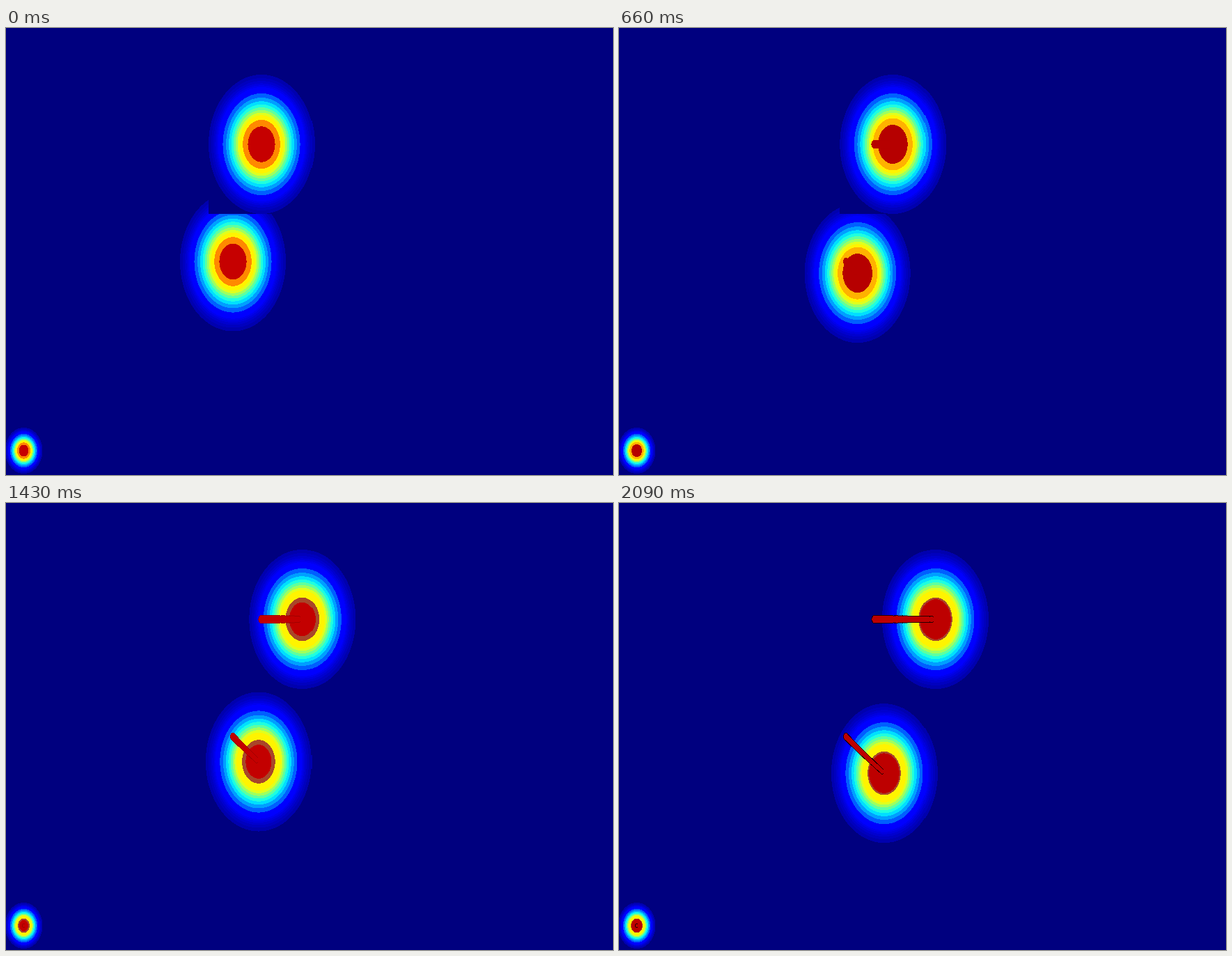
Animation, 872 px wide and 642 px high, one loop 2.2 s. Source, as a matplotlib script:

```python
import numpy as np
import matplotlib.pyplot as plt
from matplotlib.animation import FuncAnimation

W, H, FRAMES, STEP_MS = 872, 642, 20, 110
yy, xx = np.mgrid[0:H, 0:W] + 0.5


def jet(v):
    """Blue-cyan-yellow-red ramp for values from 0 to 1."""
    v = np.asarray(v, float)[..., None]
    rgb = 1.5 - abs(4 * v - np.array([3, 2, 1]))
    return np.clip(rgb, 0, 1) * 255


# Blob centres as functions of the frame number
def upper(n):
    return 367 + 4.3 * n + 0.0145 * n ** 2, 167


def lower(n):
    return 326 + 2.72 * n + 0.009 * n ** 2, 335.5 + 2.77 * n


def corner(n):
    return 25.5, 607


def core_colour(n):
    return np.array([188 + 10 * np.cos(1.4 * n), 0, 0])


def posterise(heat):
    """Fine steps in the dark blues, sixteenths above, flat yellow on top."""
    dark = np.minimum(np.round(heat * 64) / 64, 0.125)
    steps = np.floor(heat * 16) / 16 + 1 / 32
    return np.where(heat < 0.1875, dark, np.minimum(steps, 0.635))


def paint_core(rgb, r, n):
    if n % 5 < 2:
        # Warm phase: a band of the ramp around a small core
        level = np.interp(n, [0, 6, 16], [0.74, 0.70, 0.83])
        core = np.interp(n, [0, 6, 16], [0.257, 0.28, 0.18])
        rim, ring = jet(level), np.sqrt(np.log(1.12 / level) / 3.35)
    else:
        # Dull phase: a brown rim that widens and narrows
        swell = max(0, np.sin(np.pi * (n - 5) / 14))
        rim, ring, core = (168, 70, 42), 0.3125, 0.287 - 0.045 * swell
    rgb[r < ring] = rim
    rgb[r < core] = core_colour(n)


def blob(img, pos, rx, ry, n):
    dx, dy = (xx - pos[0]) / rx, (yy - pos[1]) / ry
    r = np.hypot(dx, dy)
    heat = np.where(r < 1, 1.12 * np.exp(-3.35 * r ** 2), 0)
    rgb = jet(posterise(heat))
    paint_core(rgb, r, n)
    box = (abs(dx) < 1) & (abs(dy) < 1)
    img[box] = rgb[box]


def stamps(path, n, size, grow=0):
    mask = np.zeros((H, W), bool)
    for k in np.arange(0, n - 0.9, 0.5):
        x, y = path(k)
        s = size * (1 - 0.015 * k)
        dx, dy = abs(xx - x) / (3.8 * s + grow), abs(yy - y) / (5.4 * s + grow)
        mask |= dx ** 1.6 + dy ** 1.6 < 1
    return mask


def trail(img, path, n, size):
    body = stamps(path, n, size)
    rim = stamps(path, n, size, 1) & ~body & (xx < path(n - 1)[0] + 2)
    img[rim] = core_colour(n) * (1 - (n / FRAMES) ** 4)
    img[body] = core_colour(n)


def render(n):
    img = np.empty((H, W, 3))
    img[:] = jet(0)
    blob(img, lower(n), 76, 100, n)
    blob(img, upper(n), 76, 100, n)
    blob(img, corner(n), 27, 33, n)
    for path, size in ((lower, 0.9), (upper, 1), (corner, 0.45)):
        trail(img, path, n, size)
    return img.astype(np.uint8)


fig = plt.figure(figsize=(W / 100, H / 100), dpi=100)
ax = fig.add_axes([0, 0, 1, 1])
ax.axis("off")
view = ax.imshow(render(0), interpolation="nearest", aspect="auto")


def update(n):
    view.set_data(render(n))
    return (view,)


anim = FuncAnimation(fig, update, frames=FRAMES, interval=STEP_MS,
                     repeat=True, repeat_delay=0)
plt.show()
```
